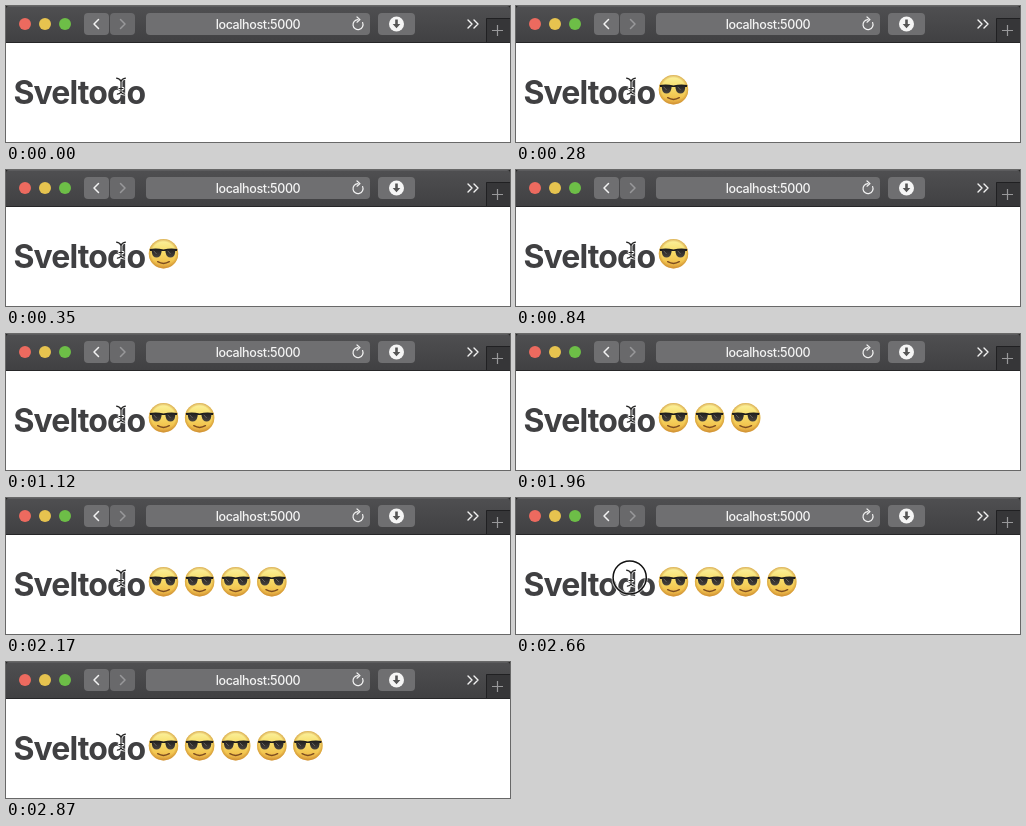
Write an HTML page that moves like this. It is 504 px wide and 136 px high and loops after 3220 ms.

```html
<!DOCTYPE html>
<html lang="en">
<head>
<meta charset="utf-8">
<title>Sveltodo</title>
<style>
  html, body { margin: 0; width: 100%; height: 100%; overflow: hidden; background: #fff; }
  svg { display: block; width: 504px; height: 136px; }
  text { font-family: Inter, "Liberation Sans", sans-serif; }
  .heading { font-size: 32px; font-weight: 700; letter-spacing: -.87px; fill: #404042; }
  .address { font-size: 12.5px; font-weight: 500; letter-spacing: -.38px; fill: #f4f4f4; text-anchor: middle; }
  .line { fill: none; stroke-linecap: round; stroke-linejoin: round; }
</style>
</head>
<body>
<svg viewBox="0 0 504 136">
  <defs>
    <linearGradient id="bar" x2="0" y2="1">
      <stop offset="0" stop-color="#4f4f51"/>
      <stop offset="1" stop-color="#404042"/>
    </linearGradient>
    <linearGradient id="skin" x2="0" y2="1">
      <stop offset="0" stop-color="#fbf2a2"/>
      <stop offset=".4" stop-color="#f8df6c"/>
      <stop offset=".75" stop-color="#f2c550"/>
      <stop offset="1" stop-color="#dd9f3c"/>
    </linearGradient>
    <radialGradient id="rim">
      <stop offset=".8" stop-color="#c98a2e" stop-opacity="0"/>
      <stop offset="1" stop-color="#c98a2e" stop-opacity=".65"/>
    </radialGradient>
    <linearGradient id="lens" x2="0" y2="1">
      <stop offset="0" stop-color="#1f1e1e"/>
      <stop offset="1" stop-color="#49443f"/>
    </linearGradient>
    <g id="face">
      <circle r="14.7" fill="url(#skin)"/>
      <circle r="14.7" fill="url(#rim)"/>
      <path d="M-5.8 8Q0 11.4 5.8 8" class="line" stroke="#7c4c20" stroke-width="1.5"/>
      <path d="M-13.8-4.7Q-7-5.8 0-4.3Q7-5.8 13.8-4.7L13.4-2.8L-13.4-2.8Z" fill="#1d1b1b"/>
      <path id="glass" d="M-11.8-4.4Q-7-5.4-1.8-3.8L-2.1-1.2Q-3 3.8-7 3.8Q-11 3.8-11.6-1.2Z" fill="url(#lens)"/>
      <use href="#glass" transform="scale(-1 1)"/>
      <path d="M-9.6-2.6L-7.2 0M4.4-2.6L6.8 0" class="line" stroke="#67625e"/>
    </g>
    <path id="beam" d="M110.6 72.2Q114 72.6 115 75.6Q116 72.6 119.4 72.2M115 75.6V86M111.4 88.2Q114.2 88 115 86Q115.8 88 118.6 88.2M113 82.5H117"/>
  </defs>

  <rect width="504" height="136" fill="#fff"/>
  <rect width="504" height="37" fill="url(#bar)"/>
  <rect width="504" height="1" fill="#5c5c5e"/>
  <rect y="36" width="504" height="1" fill="#262628"/>
  <path d="M0 0H3Q0 0 0 3ZM504 0H501Q504 0 504 3Z" fill="#222"/>

  <circle cx="19" cy="18" r="6" fill="#ec6a5f"/>
  <circle cx="39" cy="18" r="6" fill="#e6c34f"/>
  <circle cx="59" cy="18" r="6" fill="#6dbe47"/>

  <g fill="#6f6f71">
    <rect x="78" y="7" width="25" height="22" rx="4"/>
    <rect x="104" y="7" width="25" height="22" rx="4" fill="#69696b"/>
    <rect x="140" y="7" width="224" height="22" rx="4"/>
    <rect x="372" y="7" width="37" height="22" rx="4"/>
  </g>
  <g class="line" stroke="#f2f2f2" stroke-width="1.5">
    <path d="M92.5 13.5L88 18L92.5 22.5"/>
    <path d="M114.5 13.5L119 18L114.5 22.5" stroke="#98989a"/>
    <path d="M356.6 16.6A5 5 0 1 1 352 13.6M351 11L354 13.6L351 16.2" stroke-width="1.2"/>
    <path d="M462 14L466 18L462 22M468 14L472 18L468 22" stroke-width="1.4"/>
  </g>
  <circle cx="390.5" cy="18" r="7.5" fill="#f5f5f5"/>
  <path d="M389.2 13.5H391.8V18H394.3L390.5 22.3L386.7 18H389.2Z" fill="#555"/>

  <rect x="480" y="12" width="24" height="24" fill="#363638"/>
  <path d="M480.5 36V12.5H504" fill="none" stroke="#202022"/>
  <path d="M486 24.5H497M491.5 19V30" fill="none" stroke="#98989a" stroke-width="1.2"/>

  <text class="address" x="252" y="22.6">localhost:5000</text>
  <text class="heading" x="7.5" y="98">Sveltodo</text>
  <g id="faces"></g>

  <g id="ring" fill="none" visibility="hidden">
    <circle cx="113.7" cy="79.5" r="16.6" stroke="#fff" stroke-opacity=".6" stroke-width="3.4"/>
    <circle cx="113.7" cy="79.5" r="16.6" stroke="#111" stroke-width="1.5"/>
  </g>
  <use href="#beam" class="line" stroke="#fff" stroke-width="2.8"/>
  <use href="#beam" class="line" stroke="#222" stroke-width="1.2"/>
</svg>
<script>
  const LOOP = 3220, STEP = 70;
  // press, release and the moment the new face shows, in ms
  const clicks = [
    [70, 210, 280],
    [630, 840, 910],
    [1400, 1540, 1610],
    [2030, 2100, 2170],
    [2590, 2730, 2800]
  ];
  const ring = document.getElementById('ring');
  const row = document.getElementById('faces');
  const show = (el, on) => el.setAttribute('visibility', on ? 'visible' : 'hidden');

  const faces = clicks.map((_, i) => {
    const face = document.createElementNS('http://www.w3.org/2000/svg', 'use');
    face.setAttribute('href', '#face');
    face.setAttribute('x', 157.5 + i * 36.1);
    face.setAttribute('y', 83.7);
    row.append(face);
    return face;
  });

  function draw(ms) {
    const t = Math.floor((ms % LOOP) / STEP) * STEP;
    show(ring, clicks.some(([press, release]) => t >= press && t < release));
    faces.forEach((face, i) => show(face, t >= clicks[i][2]));
  }

  const start = performance.now();
  function tick() {
    draw(performance.now() - start);
    requestAnimationFrame(tick);
  }
  tick();
</script>
</body>
</html>
```
